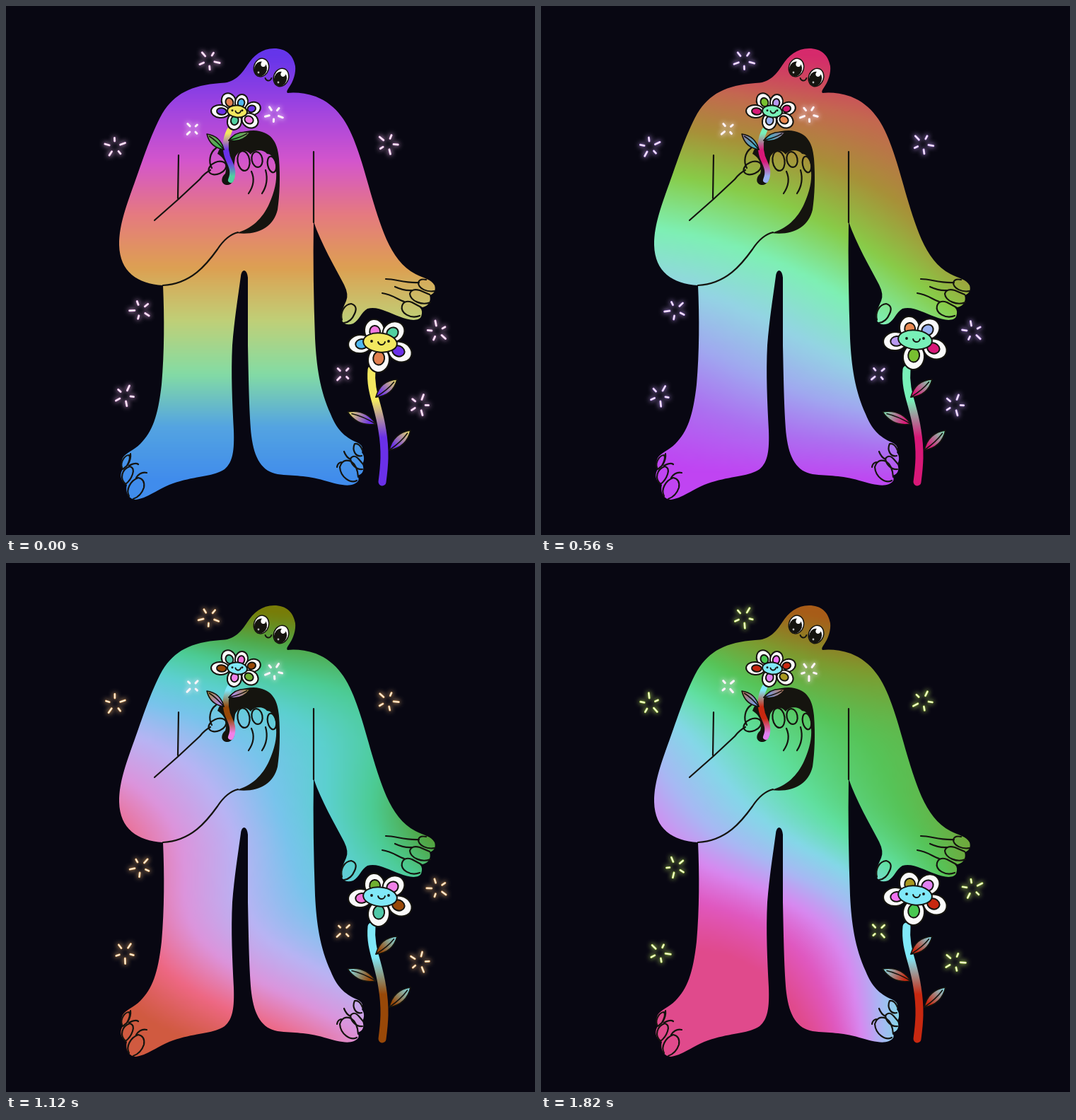
An HTML page with a canvas for the animation above (1960 ms loop, 748 by 748 pixels).

```html
<!DOCTYPE html>
<html lang="en">
<head>
<meta charset="utf-8">
<title>Rainbow giant</title>
<style>
html, body { margin: 0; height: 100%; overflow: hidden; background: #080712; }
canvas { display: block; width: 100%; height: 100%; }
</style>
</head>
<body>
<canvas id="stage" width="748" height="748"></canvas>
<script>
const STEP = 140, STEPS = 14, INK = '#15140f', BACK = '#080712';
const ctx = document.getElementById('stage').getContext('2d');
const soft = document.createElement('canvas');
soft.width = soft.height = 94;
const softCtx = soft.getContext('2d');

const colors = s => s.split(' ').map(c => c.match(/../g).map(h => parseInt(h, 16)));
// A pose: skin stops from head to feet, their spread on a 3 x 5 grid,
// and accents: pink, green, purple, orange, blue, centre, two leaf tones, sparkle.
const pose = (at, skin, grid, accents) => ({ at, skin: colors(skin), grid, accents: colors(accents) });
const poses = [
  pose(0, '6535ea a044e0 d456cc e67a80 dda052 c0d078 84dca4 54a4e2 408cec',
    [0, 0, 0, 2, 2, 2, 4, 4, 4, 6, 6, 6, 8, 8, 8],
    'f078e0 50d0a0 6a30e8 e08050 50b8f0 f2e860 3cb450 8a9a60 f0b8f0'),
  pose(1, '9020e0 c44ac8 e46a9a dc8a50 bcc04a a8e078 7cd8c8 64b0ee 6478f2',
    [0, 0, 0, 2.3, 2.2, 1.8, 4.6, 4.4, 3.4, 6.7, 6.4, 5.8, 8, 8, 7.8],
    'e868c0 50d8d0 9018e0 d09838 60c0f0 c8ec60 38b860 a088c0 f8c078'),
  pose(4, 'd62a6c c46850 a89038 88cc48 7ef0b4 94d4e4 a0a8f0 ac70f0 c044f2',
    [.4, 0, .1, 2.8, 2.1, 1, 4.7, 3.9, 2.3, 6.8, 5.6, 4.4, 8.2, 8, 7.8],
    'e88850 98b0f0 d81878 78c030 b898f0 78f0b8 40b0c8 a07898 d0a8ff'),
  pose(6, 'a06a28 7a9830 5cc858 64e4a8 78e0dc 98c0f0 cc8cec e04cc0 e04a8c',
    [1.2, .1, .4, 4.3, 3.6, 1.5, 6.7, 4.5, 1, 8.3, 4.2, 2.6, 8.3, 7.4, 6.3],
    'a89820 d080f0 c82810 48c850 f070f0 80e8f8 8898e8 c07850 e0f070'),
  pose(8, '787c08 50a848 4ccc94 5cd0d0 78c4ec b8b4f4 dc94dc ee6884 d05a40',
    [1.5, 0, .6, 4.7, 3.3, 1.6, 6.8, 4.3, 1, 7.4, 4.9, 3.4, 8.4, 7.2, 5.2],
    '70b030 f080e8 984808 50c8a8 f070d8 80e8f8 b088e8 a89030 f0b878'),
  pose(11, '568a08 48b04c 48c4a0 60c8ec a4b8f4 d8a0ec e07c98 d05a40 b86c20',
    [1.2, 0, 0, 4.1, 2.7, 1.1, 6, 3.7, 1.5, 7, 5.9, 1.7, 8.6, 8, 2.6],
    '50b020 f080f0 705808 38a8d0 e87898 b8e4f8 d078e8 909020 f0a8e8'),
  pose(13, 'a85c18 7c9c30 56c458 60e0a0 84d8e8 a8b8f4 d888f0 e058c0 e04a8c',
    [1.4, 0, 0, 4.3, 2.2, 1.6, 5.9, 3.5, 1.5, 7.6, 6.5, 2, 8.6, 8.2, .5],
    'a89820 e080f0 c82810 48c850 f070f0 80e8f8 7898e0 c07850 c8f068')
];
const bob = [0, -2, -4, -5, -4, -2, 0, -2, -4, -5, -4, -2, -4, -6];

const body = new Path2D(`M379 60 C362 60 350 70 341 84 C332 98 322 109 303 109
  C262 112 238 124 221 152 C204 182 190 228 176 266 C164 300 160 318 160 338
  C161 376 186 393 222 395 C224 440 224 490 220 535 C215 580 207 602 190 619
  C181 628 169 632 165 639 C162 646 163 651 166 654 C160 661 161 672 171 677
  C168 688 174 698 184 698 C204 695 216 680 246 672 C274 664 294 665 309 655
  C321 645 323 628 322 600 C320 560 318 520 320 480 C323 442 328 412 332 382
  Q333 374 337 374 Q341 375 342 384 L342 480 C343 530 344 580 347 608
  C351 640 362 658 384 662 C408 665 424 663 450 671 C468 676 482 680 492 676
  C499 673 500 669 497 664 C505 662 507 655 504 648 C507 642 507 636 503 631
  Q507 622 496 617 C478 609 468 599 459 577 C444 544 439 510 437 470
  C435 415 434 360 435 305 C446 337 464 367 478 394 Q485 408 481 417
  C475 430 472 438 475 445 Q480 453 491 449 C500 444 502 433 511 428
  C526 424 541 434 556 439 C570 445 584 446 587 439 Q590 431 585 426
  C596 427 602 418 599 409 C606 407 608 401 606 395 C601 386 590 385 579 379
  C560 369 548 352 538 330 C519 285 510 238 496 200 C484 165 468 140 438 128
  Q416 121 398 123 Q396 121 399 117 C407 106 410 94 409 85 C406 69 396 60 379 60 Z`);
const hollow = new Path2D(`M299 209 C304 194 322 177 350 176 C374 177 384 191 386 216
  C388 242 387 268 384 288 C378 313 356 325 325 321 C347 316 363 300 372 280
  C380 262 383 248 382 234 C382 220 377 209 369 209 C365 203 351 202 346 210
  C340 202 329 203 324 214 L321 235 C326 244 320 254 311 253
  C303 251 304 242 310 237 C314 225 308 214 299 209 Z`);
const details = new Path2D(`M244 211 L243 272 M210 303 L244 273 L274 245 Q281 236 289 232
  M222 395 C262 393 284 365 299 344 Q312 324 328 320 M435 206 L435 306
  M297 201 C288 207 286 221 291 229 M347 234 Q354 249 343 265 M367 232 Q372 250 362 265
  M537 386 C552 386 562 392 584 391 M532 406 C546 408 554 415 563 418
  M550 397 Q563 403 574 402
  M606 403 C596 405 583 400 583 391 Q585 385 594 387
  M600 419 C588 424 572 417 571 407 Q573 399 585 402 L599 408
  M585 438 C572 443 557 434 560 424 Q563 415 574 419 L587 426
  M475 444 C472 432 479 422 488 421 Q498 424 493 435 Q488 447 478 448
  M164 653 C161 645 168 635 174 635 Q177 639 171 650 L165 655 M176 633 Q177 641 172 649
  M169 676 C160 668 164 655 175 651 Q182 653 179 662 Q176 671 169 676 M174 650 Q183 645 187 648
  M174 693 C169 684 176 671 187 667 Q197 669 195 681 Q191 693 180 697 M184 667 Q190 658 199 660
  M503 636 C494 638 489 628 493 619 Q500 618 504 628
  M504 655 C495 656 488 648 487 640 Q492 633 499 641 L505 648 M487 641 Q481 638 478 630
  M496 671 C487 676 473 666 472 652 Q476 639 488 644 Q497 650 498 666 M474 645 Q469 646 468 652`);

// Each petal: offset x, y, radii, tilt, accent
const bigPetals = [[-8, -17, 14, 16, -.1, 0], [19, -15, 16, 14, -.6, 1], [-28, 2, 17, 13, -.1, 4],
  [28, 13, 17, 14, .4, 2], [-2, 24, 15, 18, .1, 3]];
const smallPetals = [[-12, -14, 10, 12, -.4, 3], [6, -13, 9, 11, .2, 4], [22, -4, 11, 9, -.3, 2],
  [18, 13, 12, 10, .5, 0], [-4, 14, 10, 12, .2, 1], [-24, 0, 13, 9, .1, 2]];
// Each sparkle: x, y, rays, turn
const sparkles = [[287, 77, 5, .3], [154, 199, 5, .9], [540, 195, 5, .1], [190, 430, 5, .5],
  [168, 551, 5, .2], [610, 460, 5, .7], [477, 520, 4, .8], [585, 564, 5, 0]];

const lerp = (a, b, t) => a + (b - a) * t;
const mix = (a, b, t) => a.map((v, i) => lerp(v, b[i], t));
const css = c => `rgb(${c.map(Math.round)})`;

function poseAt(step) {
  const i = Math.max(1, poses.findIndex(p => p.at >= step));
  const a = poses[i - 1], b = poses[i], t = (step - a.at) / (b.at - a.at);
  const blend = key => a[key].map((c, n) => mix(c, b[key][n], t));
  return { skin: blend('skin'), accents: blend('accents').map(css), grid: mix(a.grid, b.grid, t) };
}

function gridValue(grid, x, y) {
  const s = Math.max(-1, Math.min(1.1, (x - 370) / 210));
  const v = Math.max(0, Math.min(4, (y - 70) / 150)), r = Math.min(3, Math.floor(v)), t = v - r;
  const row = n => {
    const [a, b, c] = grid.slice(n * 3, n * 3 + 3);
    return b + s * (c - a) / 2 + s * s * ((a + c) / 2 - b);
  };
  const p1 = row(r), p2 = row(r + 1);
  const p0 = r ? row(r - 1) : 2 * p1 - p2, p3 = r < 3 ? row(r + 2) : 2 * p2 - p1;
  return p1 + t / 2 * (p2 - p0 + t * (2 * p0 - 5 * p1 + 4 * p2 - p3 + t * (3 * (p1 - p2) + p3 - p0)));
}

function paintSkin({ skin, grid }) {
  const img = softCtx.createImageData(94, 94);
  for (let j = 0; j < 94; j++) for (let i = 0; i < 94; i++) {
    const u = Math.max(0, Math.min(8, gridValue(grid, i * 8 + 4, j * 8 + 4)));
    const n = Math.min(7, Math.floor(u));
    img.data.set([...mix(skin[n], skin[n + 1], u - n), 255], (j * 94 + i) * 4);
  }
  softCtx.putImageData(img, 0, 0);
  ctx.save();
  ctx.clip(body);
  ctx.drawImage(soft, 0, 0, 752, 752);
  ctx.restore();
}

function oval(x, y, rx, ry, tilt, fill, line) {
  ctx.beginPath();
  ctx.ellipse(x, y, rx, ry, tilt, 0, 7);
  if (fill) { ctx.fillStyle = fill; ctx.fill(); }
  if (line) { ctx.lineWidth = line; ctx.strokeStyle = INK; ctx.stroke(); }
}

function smile(x, y, r) {
  ctx.beginPath();
  ctx.arc(x, y, r, .2, 2.94);
  ctx.lineWidth = 2;
  ctx.strokeStyle = INK;
  ctx.stroke();
}

function ramp(x0, y0, x1, y1, stops) {
  const g = ctx.createLinearGradient(x0, y0, x1, y1);
  stops.forEach(([at, color]) => g.addColorStop(at, color));
  return g;
}

function stem(path, width, style) {
  ctx.lineWidth = width;
  ctx.strokeStyle = style;
  ctx.stroke(new Path2D(path));
}

function leaf(x0, y0, x1, y1, bulge, from, to) {
  const mx = (x0 + x1) / 2, my = (y0 + y1) / 2, len = Math.hypot(x1 - x0, y1 - y0);
  const nx = (y0 - y1) / len * bulge, ny = (x1 - x0) / len * bulge;
  ctx.beginPath();
  ctx.moveTo(x0, y0);
  ctx.quadraticCurveTo(mx + nx, my + ny, x1, y1);
  ctx.quadraticCurveTo(mx - nx, my - ny, x0, y0);
  ctx.fillStyle = ramp(x0, y0, x1, y1, [[.2, from], [1, to]]);
  ctx.fill();
  ctx.lineWidth = 1.6;
  ctx.strokeStyle = INK;
  ctx.stroke();
  ctx.beginPath();
  ctx.moveTo(x0, y0);
  ctx.quadraticCurveTo(mx + nx * .2, my + ny * .2, lerp(x0, x1, .85), lerp(y0, y1, .85));
  ctx.stroke();
}

function flower(x, y, petals, rx, ry, accents) {
  for (const [dx, dy, a, b, tilt] of petals) oval(x + dx, y + dy, a, b, tilt, '#fafafa', 2);
  for (const [dx, dy, a, b, tilt, n] of petals)
    oval(x + dx * .92, y + dy * .92, a * .53, b * .53, tilt, accents[n], 2);
  oval(x, y, rx, ry, .1, accents[5], 2);
  const k = rx / 24;
  for (const side of [-1, 1]) oval(x + side * 12 * k, y - 2 * k, .9 + k, .9 + k, 0, INK);
  smile(x + 2 * k, y - 2 * k, 2 + 3 * k);
}

function eye(x, y, tilt) {
  oval(x, y, 10.5, 13, tilt, '#fff', 1.5);
  oval(x - 1, y + 2, 9, 10.5, tilt, INK);
  oval(x + 3, y - 5, 3.5, 4, tilt, '#fff');
  oval(x - 4, y + 7, 1.4, 1.4, 0, '#bbb');
}

function sparkle(x, y, rays, turn, color, size, step) {
  ctx.save();
  ctx.translate(x, y);
  ctx.shadowColor = color;
  ctx.shadowBlur = 7;
  for (let i = 0; i < rays; i++) {
    const a = turn + i * 2 * Math.PI / rays + .08 * Math.sin(step * 2 + x);
    const end = size + 1.5 * Math.sin(i * 2.4 + step * 1.7 + y);
    ctx.beginPath();
    ctx.moveTo(Math.cos(a) * size * .58, Math.sin(a) * size * .58);
    ctx.lineTo(Math.cos(a) * end, Math.sin(a) * end);
    for (const [w, c] of [[3, color], [1.3, '#fffaf2']]) {
      ctx.lineWidth = w;
      ctx.strokeStyle = c;
      ctx.stroke();
    }
  }
  ctx.restore();
}

function draw(step) {
  const now = poseAt(step), acc = now.accents;
  const [, green, purple, , , centre, leafA, leafB, glow] = acc;
  ctx.fillStyle = BACK;
  ctx.fillRect(0, 0, 748, 748);
  ctx.lineCap = ctx.lineJoin = 'round';
  paintSkin(now);

  ctx.fillStyle = INK;
  ctx.fill(hollow);
  stem(details, 2.2, INK);
  oval(336, 219, 8.5, 14, -.15, null, 2.2);
  oval(355, 217, 7.5, 11, -.2, null, 2.2);
  oval(376, 224, 6, 11.5, -.2, null, 2.2);
  oval(299, 229, 13, 8.5, -.4, null, 2.2);

  eye(361, 87, .25);
  eye(389, 101, .35);
  smile(371, 101, 4.5);

  stem('M316 176 C310 188 309 200 313 213 C317 224 324 232 318 246', 8,
    ramp(0, 174, 0, 248, [[.08, centre], [.4, purple], [.62, purple], [.9, green]]));
  leaf(308, 203, 284, 181, 11, leafA, leafB);
  leaf(315, 190, 345, 179, 10, leafA, leafB);
  flower(327, 149, smallPetals, 14, 8.5, acc);

  stem('M517 514 C514 545 527 564 532 600 C537 630 535 650 532 673', 11,
    ramp(0, 515, 0, 673, [[.27, centre], [.6, purple], [1, purple]]));
  leaf(523, 553, 553, 528, 14, purple, centre);
  leaf(523, 591, 483, 574, 14, purple, centre);
  leaf(542, 628, 572, 600, 14, purple, centre);
  flower(529, 476 + bob[step], bigPetals, 24, 13.5, acc);

  for (const s of sparkles) sparkle(...s, glow, s[0] === 477 ? 11 : 14, step);
  sparkle(264, 174, 4, .8, '#fff0ff', 10, step);
  sparkle(379, 153, 5, .3, '#fff0ff', 12, step);
}

let last = -1;
function tick(time) {
  const step = Math.floor(time / STEP) % STEPS;
  if (step !== last) draw(last = step);
  requestAnimationFrame(tick);
}
tick(0);
</script>
</body>
</html>
```
